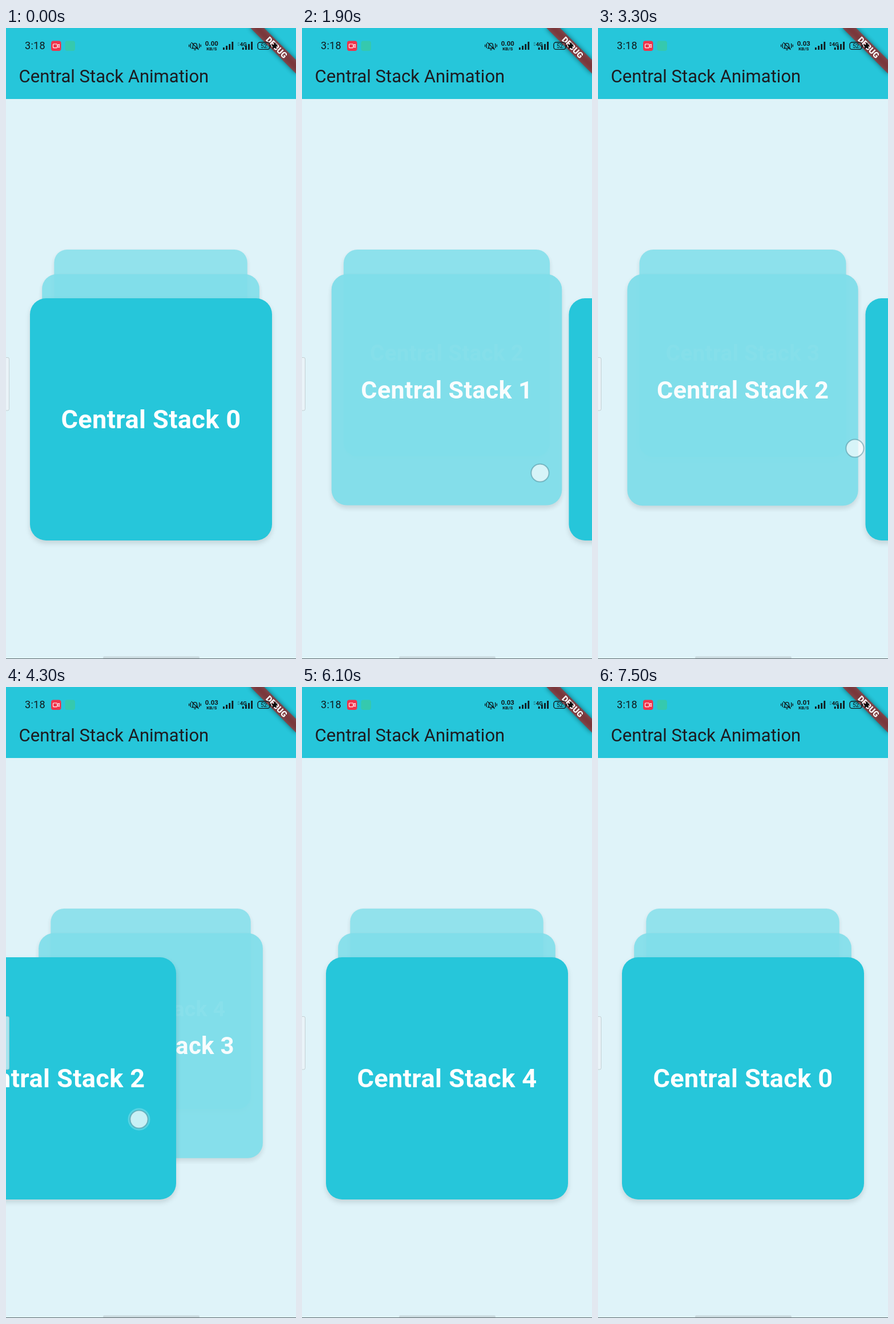
Animation, 508 px wide and 1102 px high, one loop 8 s. Source, as an HTML page:

```html
<!DOCTYPE html>
<html lang="en">
<head>
<meta charset="utf-8">
<title>Central Stack Animation</title>
<style>
  html, body { margin: 0; width: 100%; height: 100%; overflow: hidden; }
  body { position: relative; background: #dff3f9; font-family: Roboto, sans-serif; }
  .bar { position: absolute; inset: 0 0 auto; height: 124.2px; background: #26c6da; }
  .card {
    position: absolute; left: 42.3px; width: 423.4px; height: 423.4px;
    display: flex; align-items: center; justify-content: center;
    border-radius: 28.2px; background: #80deea; color: #fff;
    box-shadow: 0 5px 10px rgba(0, 0, 0, .13);
    font-size: 45.16px; font-weight: 700; letter-spacing: .353px; white-space: nowrap;
    transform-origin: 50% 0;
  }
  #back { top: 386.9px; }
  #next { top: 429.5px; }
  #front { top: 471.8px; background: #26c6da; }
  svg { position: absolute; left: 0; top: 0; }
</style>
</head>
<body>
<div class="bar"></div>
<div class="card" id="back"></div>
<div class="card" id="next"></div>
<div class="card" id="front"></div>

<svg width="508" height="1102" viewBox="0 0 508 1102" font-family="Roboto, sans-serif">
  <defs>
    <filter id="soft" x="-30%" y="-150%" width="160%" height="400%"><feGaussianBlur stdDeviation="4.5"/></filter>
    <g id="signal" fill="#10191c">
      <rect y="34" width="2.8" height="4"/>
      <rect x="5.2" y="31" width="2.8" height="7"/>
      <rect x="10.3" y="28" width="2.8" height="10"/>
      <rect x="15.4" y="24" width="2.8" height="14"/>
    </g>
  </defs>

  <text x="22.6" y="94.8" font-size="31.04" fill="#1d1b20">Central Stack Animation</text>

  <!-- Debug banner -->
  <g transform="translate(508 0) rotate(45)">
    <rect x="-56.4" y="39.5" width="112.9" height="16.9" opacity=".5" filter="url(#soft)"/>
    <rect x="-56.4" y="39.5" width="112.9" height="16.9" fill="#b71c1c" fill-opacity=".627"/>
    <text y="53.1" font-size="14.4" font-weight="900" fill="#fff" text-anchor="middle">DEBUG</text>
  </g>

  <!-- Status bar -->
  <text x="33" y="37.3" font-size="18" letter-spacing=".3" fill="#10191c">3:18</text>
  <rect x="79" y="22.5" width="17.5" height="17.5" rx="4" fill="#f0344b"/>
  <g fill="none" stroke="#fff" stroke-width="1.1" stroke-linejoin="round">
    <rect x="82.5" y="28" width="7.3" height="6.6" rx="1"/>
    <path d="M90 30.4l3.2-1.8v5.4l-3.2-1.8"/>
  </g>
  <rect x="103.5" y="22.5" width="17.5" height="17.5" rx="4" fill="#35c9ae"/>
  <g fill="none" stroke="#10191c" stroke-width="1.4" stroke-linecap="round">
    <path d="M326 35.5h10q-1.6-1.5-1.6-5.5a3.4 3.4 0 0 0-6.8 0q0 4-1.6 5.5zM330 38h2M325 25.5l12 12"/>
    <path d="M323.3 27.5v7M320.7 29.5v3M338.7 27.5v7M341.3 29.5v3"/>
  </g>
  <g font-weight="700" text-anchor="middle" fill="#10191c">
    <text id="speed" x="360.3" y="31" font-size="11.4">0.00</text>
    <text x="360.3" y="39.3" font-size="8">KB/S</text>
    <text x="415.8" y="31.5" font-size="9.5">4G</text>
  </g>
  <use href="#signal" x="380"/>
  <use href="#signal" x="413.8"/>
  <path id="upload" d="M405 27.2l2.3-2.6 2.3 2.6z" fill="#10191c"/>
  <path id="download" d="M405 29l2.3 2.6 2.3-2.6z" fill="#10191c"/>
  <rect x="441" y="25" width="21" height="12.4" rx="4" fill="none" stroke="#10191c" stroke-width="1.4"/>
  <text x="451.5" y="34.8" font-size="10" text-anchor="middle" fill="#10191c">52</text>
  <path d="M463.4 29v4.4" stroke="#10191c" stroke-width="1.4"/>
  <path d="M471.5 24.5l1 4 3.5.5-2.6 3 .8 4.8-4-2.2-3.5 2.7.8-4.5-2.5-2.8 3.9-.8z" fill="#0a0a0c"/>

  <!-- Edge handle and navigation bar -->
  <rect x="-3" y="575.5" width="8.5" height="92.5" rx="2.5" fill="#eef5f7" fill-opacity=".65" stroke="#b5bfc2" stroke-opacity=".7"/>
  <rect x="170" y="1097.5" width="169" height="4" rx="2" fill="#c8d8dd"/>
  <rect y="1101" width="508" height="1" fill="#59666a"/>

  <g id="touch">
    <circle id="halo" r="19.5" fill="#fff" fill-opacity=".22"/>
    <circle r="15.6" fill="#fff" fill-opacity=".68" stroke="#4b8795" stroke-opacity=".5" stroke-width="2"/>
  </g>
</svg>

<script>
const LOOP = 8000, STEP = 100;
const CARDS = 5, STAGE_WIDTH = 508;
const FLING = 1.5, OFFSCREEN = 520;   // px per ms, px

// Times in ms; x and y are where the finger lands, reach is how far it drags.
const swipes = [
  { dir: 1, start: 1100, up: 1799, end: 2100, x: 143, y: 777, reach: 274 },
  { dir: 1, start: 2500, up: 3205, end: 3600, x: 166, y: 734, reach: 284 },
  { dir: -1, start: 3900, up: 4284, end: 4700, x: 377, y: 755, reach: 144 },
  { dir: -1, start: 5350, up: 5540, end: 5900, x: 347, y: 757, reach: 193 },
  { dir: 1, start: 6400, up: 7000, end: 7350, x: 150, y: 760, reach: 280 }
];

const $ = id => document.getElementById(id);
const [front, next, back] = ['front', 'next', 'back'].map($);
const progress = (t, a, b) => Math.min(1, Math.max(0, (t - a) / (b - a)));

function place(card, index, x, scale, opacity) {
  card.textContent = `Central Stack ${index % CARDS}`;
  card.style.transform = `translateX(${x}px) scale(${scale})`;
  card.style.opacity = opacity;
}

function drawCards(t) {
  const done = swipes.filter(s => t >= s.end).length;
  const s = swipes[done];
  let offset = 0, lift = 0;
  if (s) {
    const drag = s.reach * progress(t, s.start, s.up) ** 2;
    const fling = FLING * Math.max(0, t - s.up);
    offset = s.dir * Math.min(OFFSCREEN, drag + fling);
    const pulled = drag / STAGE_WIDTH;
    lift = pulled + (1 - pulled) * progress(t, s.up + 100, s.end);
  }
  place(back, done + 2, 0, .8 + .1 * lift, .8 + .1 * lift);
  place(next, done + 1, 0, .9 + .1 * lift, .9 + .1 * lift);
  place(front, done, offset, 1, 1);
}

function drawTouch(t) {
  const s = swipes.find(s => t >= s.start - 100 && t < s.up + 250);
  $('touch').style.display = s ? '' : 'none';
  if (!s) return;
  const x = s.x + s.dir * s.reach * progress(t, s.start, s.up) ** 2;
  $('touch').setAttribute('transform', `translate(${x} ${s.y})`);
  $('touch').style.opacity = 1 - progress(t, s.up + 105, s.up + 250);
  $('halo').style.display = s.dir < 0 ? '' : 'none';
}

function drawStatus(t) {
  $('speed').textContent = t < 3100 ? '0.00' : t < 6400 ? '0.03' : '0.01';
  const both = t >= 3100 && t < 4000;
  const receiving = both || (t >= 5000 && t < 5900);
  $('upload').style.opacity = both ? 1 : .3;
  $('download').style.opacity = receiving ? 1 : .3;
}

function frame(now) {
  const t = Math.floor(now % LOOP / STEP) * STEP;
  drawCards(t);
  drawTouch(t);
  drawStatus(t);
  requestAnimationFrame(frame);
}
frame(performance.now());
</script>
</body>
</html>
```
